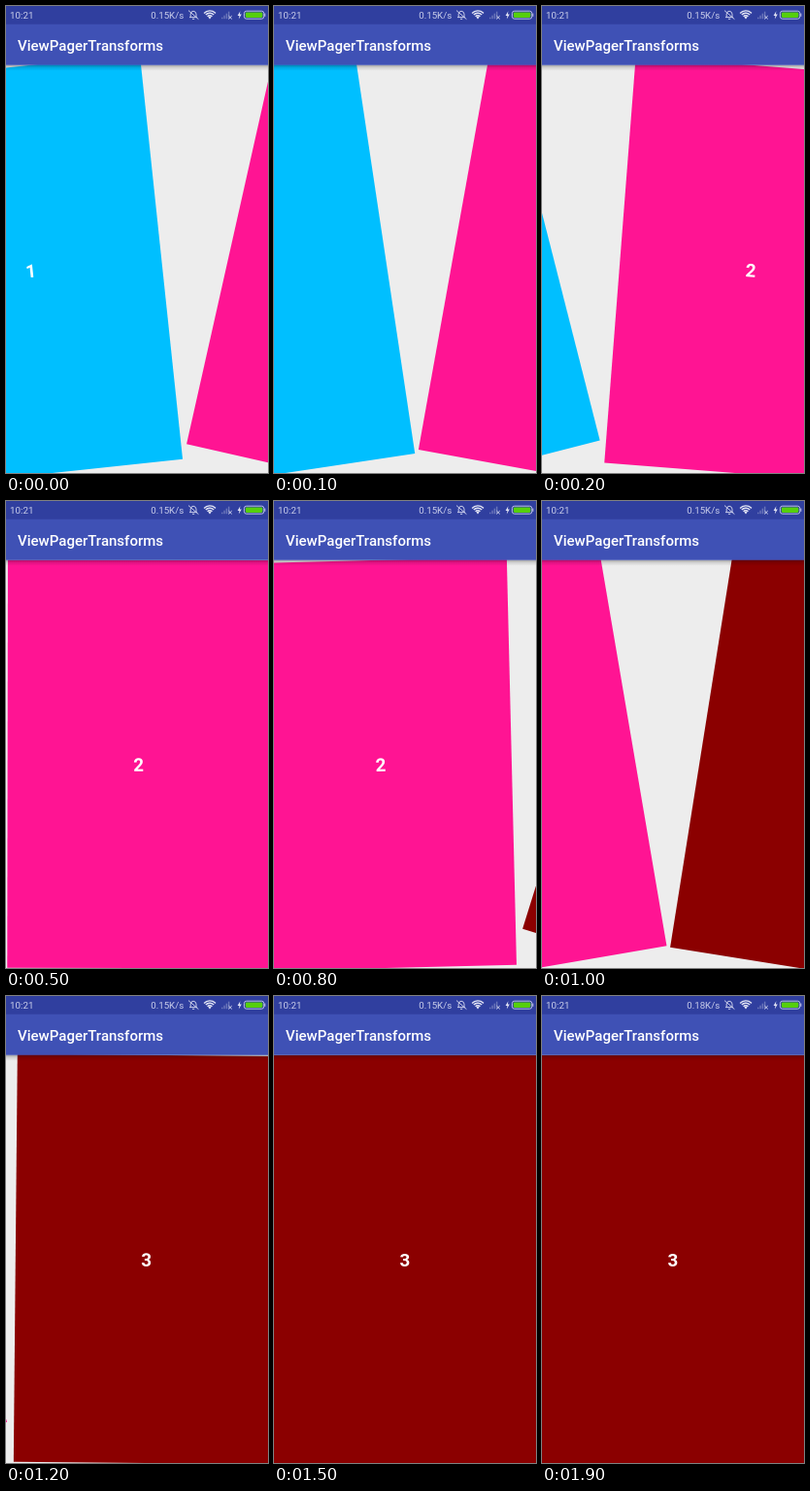
These frames come from a looping animation (270 by 480 pixels, 2000 ms). An HTML page with a canvas:

```html
<!DOCTYPE html>
<html lang="en">
<head>
<meta charset="utf-8">
<title>ViewPagerTransforms</title>
<style>
html, body { margin: 0; width: 100%; height: 100%; overflow: hidden; background: #ededed; }
canvas { display: block; width: 270px; height: 480px; }
</style>
</head>
<body>
<canvas id="stage"></canvas>
<script>
const W = 270, H = 480, LOOP = 2000, STEP = 100;
const STATUS_H = 18.75, TOP = 60.75;
const MAX_TILT = 18.75 * Math.PI / 180;
const FONT = 'Roboto, "Open Sans", sans-serif';
const PAGES = ['#00bfff', '#ff1493', '#8b0000'];
const ICON = '#c9cdea';

const canvas = document.getElementById('stage');
const ctx = canvas.getContext('2d');
const ratio = window.devicePixelRatio || 1;
canvas.width = Math.round(W * ratio);
canvas.height = Math.round(H * ratio);

// Pager offset, in pages: two swipes, each a drag and then a quintic settle.
const settle = (page, left) => page - Math.pow(Math.max(0, left), 5);
function offsetAt(step) {
  if (step < 1) return 0.323;
  if (step < 7) return settle(1, 0.7495 - 0.1357 * (step - 2));
  if (step < 11) return [1.015, 1.074, 1.245, 1.517][step - 7];
  return settle(2, 0.4926 - 0.136 * (step - 12));
}

function rect(x, y, w, h, fill) {
  ctx.fillStyle = fill;
  ctx.fillRect(x, y, w, h);
}

function label(text, x, y, size, weight, fill, align = 'left') {
  ctx.font = `${weight} ${size}px ${FONT}`;
  ctx.textAlign = align;
  ctx.fillStyle = fill;
  ctx.fillText(text, x, y);
}

function stroke(d, width = 1, color = ICON) {
  ctx.strokeStyle = color;
  ctx.lineWidth = width;
  ctx.stroke(new Path2D(d));
}

function fill(d, color = ICON) {
  ctx.fillStyle = color;
  ctx.fill(new Path2D(d));
}

// Each page swings around the middle of its bottom edge.
function drawPage(index, offset) {
  const pos = index - offset;
  if (Math.abs(pos) >= 1) return;
  ctx.save();
  ctx.translate(W / 2 + pos * W, H);
  ctx.rotate(pos * MAX_TILT);
  rect(-W / 2, TOP - H, W, H - TOP, PAGES[index]);
  label(String(index + 1), 0, 277.7 - H, 18.75, 700, '#fff', 'center');
  ctx.restore();
}

function drawBell() {
  stroke('M189 11.6 H197 M190.2 11.2 V8.2 Q190.4 5.6 193 5.2 Q195.8 5.6 196 8.2 V11.2 M192 13.3 H194.2');
  stroke('M188 4.6 L198.4 13.6');
}

function drawWifi() {
  for (const r of [3.3, 5.7, 8.1]) {
    ctx.beginPath();
    ctx.arc(210, 13, r, -Math.PI * 0.76, -Math.PI * 0.24);
    ctx.strokeStyle = '#e4e6f5';
    ctx.lineWidth = 1.4;
    ctx.stroke();
  }
  fill('M208.4 11.4 Q210 10.3 211.6 11.4 L210 13.4 Z', '#e4e6f5');
}

function drawSignal() {
  for (let i = 0; i < 4; i++) {
    const h = 1.5 + i * 2;
    rect(222 + i * 2.3, 13.2 - h, 1.5, h, 'rgba(255,255,255,.27)');
  }
  stroke('M229.4 10 L232.8 13.4 M232.8 10 L229.4 13.4');
}

function drawBattery() {
  fill('M241.4 5.2 L238.6 9.9 H240.5 L239.8 13.4 L242.8 8.5 H240.9 Z', '#e4e6f5');
  ctx.beginPath();
  ctx.roundRect(245.4, 5.2, 20.4, 8, 2.4);
  ctx.strokeStyle = ICON;
  ctx.lineWidth = 0.9;
  ctx.stroke();
  ctx.beginPath();
  ctx.roundRect(246.8, 6.5, 17.6, 5.4, 1.3);
  ctx.fillStyle = '#55cf0c';
  ctx.fill();
  rect(266.3, 7.6, 1, 3.2, ICON);
}

function drawBars(speed) {
  const shade = ctx.createLinearGradient(0, TOP, 0, TOP + 6);
  shade.addColorStop(0, 'rgba(0,0,0,.32)');
  shade.addColorStop(0.4, 'rgba(0,0,0,.12)');
  shade.addColorStop(1, 'rgba(0,0,0,0)');
  rect(0, TOP, W, 6, shade);
  rect(0, 0, W, TOP, '#3f51b5');
  rect(0, 0, W, STATUS_H, '#303f9f');
  label('ViewPagerTransforms', 12, 45.7, 15, 500, '#fff');
  label('10:21', 4, 13.2, 9.8, 400, ICON);
  label(speed, 149.2, 13.2, 9.7, 400, ICON);
  drawBell();
  drawWifi();
  drawSignal();
  drawBattery();
}

function draw(ms) {
  const step = Math.floor((ms % LOOP) / STEP);
  const offset = offsetAt(step);
  ctx.setTransform(ratio, 0, 0, ratio, 0, 0);
  rect(0, 0, W, H, '#ededed');
  PAGES.forEach((_, i) => drawPage(i, offset));
  drawBars(step < 19 ? '0.15K/s' : '0.18K/s');
}

const start = performance.now();
function tick() {
  draw(performance.now() - start);
  requestAnimationFrame(tick);
}
tick();
</script>
</body>
</html>
```
